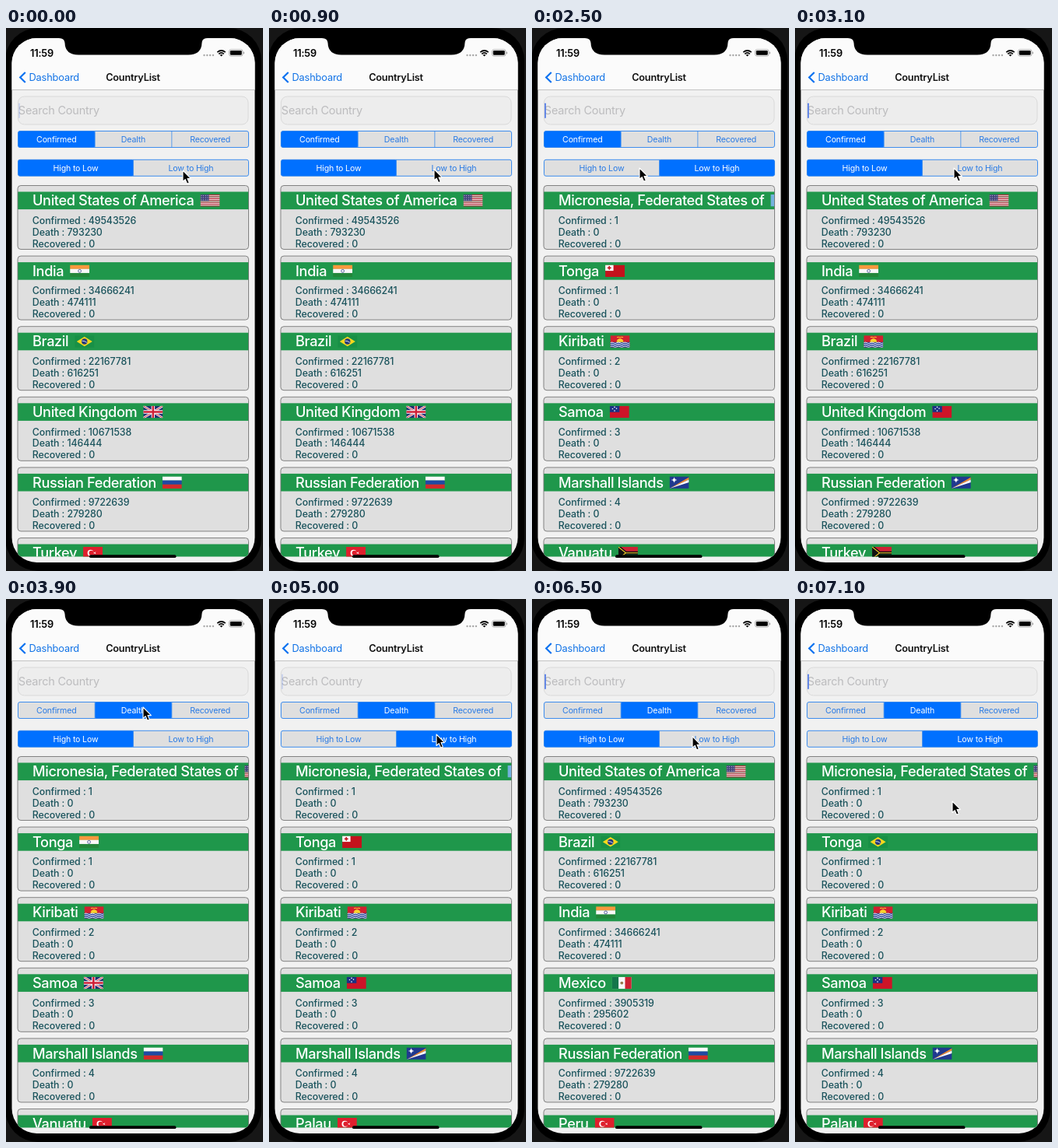
An HTML page that plays this animation: 330x698 px, repeating every 7200 ms.

```html
<!DOCTYPE html>
<html lang="en">
<head>
<meta charset="utf-8">
<style>
  html, body { margin: 0; width: 100%; height: 100%; overflow: hidden; background: #161616; }
  svg { display: block; }
  text { font-family: Inter, sans-serif; letter-spacing: -.015em; white-space: pre; }
  .mid { text-anchor: middle; }
  .seg text { font-size: 10.6px; fill: #2a7be4; }
  .seg .on { fill: #0070ff; }
  .seg text.on { fill: #fff; }
  .name { font-size: 18.2px; font-weight: 500; letter-spacing: -.021em; fill: #fff; }
  .info { font-size: 12.4px; font-weight: 500; letter-spacing: -.008em; fill: #1a535c; }
</style>
</head>
<body>
<svg width="330" height="698" viewBox="0 0 330 698">
  <defs>
    <clipPath id="screen"><rect x="7.500" y="13" width="312" height="674" rx="32"/></clipPath>
    <clipPath id="listArea"><rect x="7" y="195" width="314" height="484.5"/></clipPath>
    <clipPath id="cardArea"><rect width="296.5" height="82" rx="4"/></clipPath>
    <clipPath id="flagArea"><rect width="25" height="15.5"/></clipPath>
  </defs>
  <rect x="-1" width="329" height="698" rx="42"/>
  <g clip-path="url(#screen)">
    <rect width="330" height="698" fill="#f1f1f1"/>
    <rect width="330" height="79" fill="#fbfbfb"/>
    <path d="M0 79.500H330" stroke="#c4c4c4"/>
    <path d="M68 12V13Q75 13 75.500 19Q76 34.500 93 34.500H234Q251 34.500 251.500 19Q252 13 259 13V12Z"/>
    <text class="mid" x="46" y="36.500" font-size="12.8" font-weight="600">11:59</text>
    <g fill="#a9a9a9">
      <circle cx="254.500" cy="35" r="1.200"/><circle cx="258.300" cy="35" r="1.200"/>
      <circle cx="262.100" cy="35" r="1.200"/><circle cx="265.900" cy="35" r="1.200"/>
    </g>
    <path d="M271.300 31.200Q276.500 26.800 281.700 31.200M273.200 33.300Q276.500 30.600 279.800 33.300" fill="none" stroke="#000" stroke-width="1.700"/>
    <path d="M274.500 34.600Q276.500 33.200 278.500 34.600L276.500 36.600Z"/>
    <rect x="286.500" y="27.700" width="17.500" height="8.400" rx="2.400" fill="none" stroke="#a0a0a0" stroke-width=".8"/>
    <rect x="287.800" y="29" width="14.900" height="5.800" rx="1.300"/>
    <rect x="304.800" y="30.500" width="1.200" height="2.800" rx=".6" fill="#a0a0a0"/>
    <path d="M24.800 57L18.200 63.500L24.800 70" fill="none" stroke="#0a72f0" stroke-width="2.200"/>
    <text x="29.500" y="68" font-size="12.85" fill="#1273e6">Dashboard</text>
    <text class="mid" x="163" y="67.500" font-size="12.7" font-weight="600" fill="#111">CountryList</text>
    <rect x="15.500" y="88" width="295.500" height="36" rx="8" fill="#ededed" stroke="#d9d9d9"/>
    <text x="15.800" y="111" font-size="14.500" fill="#bcbcbe">Search Country</text>
    <rect id="caret" x="16.200" y="96.500" width="1.700" height="19.500" rx=".8" fill="#4f78e6"/>
    <g id="metric" class="seg"></g>
    <g id="order" class="seg"></g>
    <g id="list" clip-path="url(#listArea)"></g>
    <rect x="107" y="677.300" width="111.500" height="3.800" rx="1.900"/>
  </g>
  <path id="cursor" d="M0 0V14.500L3.200 11.600L5.600 17.200L8.300 16.100L6 10.600H10.400Z" stroke="#fff" stroke-width="1.100" stroke-linejoin="round"/>
</svg>
<script>
const LOOP = 7200, STEP = 100;
const $ = id => document.getElementById(id);

const rect = (x, y, w, h, fill) => `<rect x="${x}" y="${y}" width="${w}" height="${h}" fill="${fill}"/>`;
const line = (d, stroke, width = 1) => `<path d="${d}" fill="none" stroke="${stroke}" stroke-width="${width}"/>`;
const shape = (d, fill) => `<path d="${d}" fill="${fill}"/>`;
const dot = (x, y, r, fill = '#fff') => `<circle cx="${x}" cy="${y}" r="${r}" fill="${fill}"/>`;
const base = fill => rect(0, 0, 25, 15.5, fill);
const bands = (...colours) => colours.map((c, i) => rect(0, i * 15.5 / colours.length, 25, 15.5 / colours.length + .1, c)).join('');
const waves = [9.6, 12, 14.4].map(y => line(`M0 ${y}q2.100-1.600 4.200 0t4.200 0t4.200 0t4.200 0t4.200 0t4.200 0`, '#fff', 1)).join('');
const saltire = 'M0 0L25 15.500M25 0L0 15.500', cross = 'M12.500 0V15.500M0 7.750H25';

const flags = {
  us: bands(...Array.from({ length: 13 }, (_, i) => i % 2 ? '#f2e4e6' : '#c0293f')) + rect(0, 0, 11, 8.3, '#3f3f78') +
    Array.from({ length: 12 }, (_, i) => dot(1.6 + i % 4 * 2.6, 1.5 + (i >> 2) * 2.6, .5)).join(''),
  in: bands('#f7983c', '#f8f8f8', '#23873a') + `<circle cx="12.500" cy="7.750" r="1.900" fill="none" stroke="#33408c" stroke-width=".8"/>`,
  br: base('#189046') + shape('M12.500 1.500L22.500 7.750L12.500 14L2.500 7.750Z', '#f8d81c') + dot(12.5, 7.75, 3.7, '#26397c') + line('M9.300 7Q13 6.800 15.500 9.200', '#fff', .8),
  gb: base('#222f70') + line(saltire, '#fff', 2.6) + line(saltire, '#cf2038', 1) + line(cross, '#fff', 4.4) + line(cross, '#cf2038', 2.6),
  ru: bands('#fafafa', '#2049a4', '#d22b2b'),
  tr: base('#df1f2d') + dot(9.5, 7.75, 3.9) + dot(10.6, 7.75, 3.1, '#df1f2d') + shape('M13.200 7.750L16.500 6.200L15.500 7.750L16.500 9.300Z', '#fff'),
  fm: base('#74b2de') + dot(12.5, 3.4, 1) + dot(12.5, 12.1, 1) + dot(7.5, 7.75, 1) + dot(17.5, 7.75, 1),
  to: base('#c4121c') + rect(0, 0, 10.5, 7.5, '#fff') + line('M5.200 1.400V6.200M2.800 3.800H7.600', '#c4121c', 1.6),
  ki: base('#d3202f') + dot(12.5, 8.5, 4.4, '#f9d22c') + line('M8.500 2.500Q11 1.500 12.500 2.800Q14 1.500 16.500 2.500', '#f9d22c') + rect(0, 8.6, 25, 7, '#213b94') + waves,
  ws: base('#cd1428') + rect(0, 0, 12.5, 8, '#1b3284') + dot(6.2, 1.6, .8) + dot(6.2, 6.3, .8) + dot(3.7, 3.7, .8) + dot(8.7, 3.3, .8),
  mh: base('#20398f') + shape('M0 15.500L25 1V4.200Z', '#ef8b2f') + shape('M0 15.500L25 4.200V7.500Z', '#fff') + dot(6, 4.6, 1.9) + line('M6 1.200V8M2.600 4.600H9.400', '#fff', .7),
  vu: bands('#cf2234', '#168a45') + line('M0 0L9.500 7.750H25M0 15.500L9.500 7.750', '#111', 4) + line('M0 0L9.500 7.750H25M0 15.500L9.500 7.750', '#f2ca2c', 1.1) + shape('M0 2L7 7.750L0 13.500Z', '#111'),
  mx: base('#f8f8f8') + rect(0, 0, 8.3, 15.5, '#14764a') + rect(16.7, 0, 8.3, 15.5, '#cc2233') + dot(12.5, 7.75, 1.9, '#98784c'),
};

// Name, confirmed, deaths
const usa = ['United States of America', 49543526, 793230], india = ['India', 34666241, 474111],
  brazil = ['Brazil', 22167781, 616251], russia = ['Russian Federation', 9722639, 279280];
const fewest = [['Micronesia, Federated States of', 1, 0], ['Tonga', 1, 0], ['Kiribati', 2, 0], ['Samoa', 3, 0], ['Marshall Islands', 4, 0]];
const lists = {
  mostCases: [usa, india, brazil, ['United Kingdom', 10671538, 146444], russia, ['Turkey', 0, 0]],
  fewestCases: [...fewest, ['Vanuatu', 0, 0]],
  mostDeaths: [usa, brazil, india, ['Mexico', 3905319, 295602], russia, ['Peru', 0, 0]],
  fewestDeaths: [...fewest, ['Palau', 0, 0]],
};

// Time, metric tab, order tab, list, flags per row (images load after the text)
const states = [
  [0, 0, 0, 'mostCases', 'us in br gb ru tr'],
  [1500, 0, 1, 'fewestCases', 'us in br gb ru tr'],
  [1600, 0, 1, 'fewestCases', 'us to br gb ru tr'],
  [1700, 0, 1, 'fewestCases', 'fm to ki gb ru tr'],
  [1800, 0, 1, 'fewestCases', 'fm to ki ws mh vu'],
  [2900, 0, 0, 'mostCases', 'fm to ki ws mh vu'],
  [3000, 0, 0, 'mostCases', 'us in ki ws mh vu'],
  [3200, 0, 0, 'mostCases', 'us in br gb ru tr'],
  [3800, 1, 0, 'fewestCases', 'us in br gb ru tr'],
  [3900, 1, 0, 'fewestCases', 'us in ki gb ru tr'],
  [4000, 1, 0, 'fewestCases', 'fm to ki ws mh tr'],
  [4800, 1, 1, 'fewestDeaths', 'fm to ki ws mh tr'],
  [5700, 1, 0, 'mostDeaths', 'fm to ki ws mh tr'],
  [5900, 1, 0, 'mostDeaths', 'us br ki ws mh tr'],
  [6000, 1, 0, 'mostDeaths', 'us br in mx ru tr'],
  [6600, 1, 1, 'fewestDeaths', 'us br in mx ru tr'],
  [6800, 1, 1, 'fewestDeaths', 'us br ki ws mh tr'],
];

// Time, x, y
const path = [[0, 227, 183], [500, 217, 181], [1300, 207, 182], [1800, 207, 182], [2500, 138, 180], [2850, 142, 180],
  [3100, 204, 180], [3300, 204, 178], [3700, 176, 139], [4000, 176, 139], [4600, 215, 174], [5000, 215, 174],
  [5500, 122, 175], [5900, 122, 175], [6400, 206, 176], [6650, 206, 178], [7000, 202, 260], [7200, 202, 260]];

const clamp = v => Math.max(0, Math.min(1, v));

function tabs(y, labels, active) {
  const w = 296 / labels.length;
  return `<rect x="15.500" y="${y}" width="296" height="21" rx="2.500" fill="#dfdfdf"/>` +
    labels.map((label, i) => {
      const x = 15.5 + i * w, on = i === active ? 'on' : '';
      return (on && `<rect class="on" x="${x}" y="${y}" width="${w}" height="21" rx="2"/>`) +
        (i ? line(`M${x} ${y}v21`, '#3c8cec', .8) : '') +
        `<text class="mid ${on}" x="${x + w / 2}" y="${y + 14.4}">${label}</text>`;
    }).join('') +
    `<rect x="15.500" y="${y}" width="296" height="21" rx="2.500" fill="none" stroke="#2b83ee" stroke-width=".9"/>`;
}

function card([name, confirmed, deaths], i, flag) {
  const info = [`Confirmed : ${confirmed}`, `Death : ${deaths}`, 'Recovered : 0'];
  return `<g transform="translate(15 ${202.5 + i * 90.6})"><g clip-path="url(#cardArea)">
    ${rect(0, 0, 297, 82, '#dfdfdf')}${rect(0, 8, 297, 22.6, '#1f974b')}
    <text class="name" x="19" y="25.800">${name}</text>
    <g class="flag" clip-path="url(#flagArea)">${flags[flag]}</g>
    ${info.map((s, k) => `<text class="info" x="18.800" y="${49.4 + k * 14.8}">${s}</text>`).join('')}
    </g><rect width="296.500" height="82" rx="4" fill="none" stroke="#777" stroke-width=".9"/></g>`;
}

function show([, metric, order, list, codes]) {
  $('metric').innerHTML = tabs(132.5, ['Confirmed', 'Dealth', 'Recovered'], metric);
  $('order').innerHTML = tabs(169.3, ['High to Low', 'Low to High'], order);
  codes = codes.split(' ');
  $('list').innerHTML = lists[list].map((row, i) => card(row, i, codes[i])).join('');
  for (const flag of document.querySelectorAll('.flag')) {
    const end = 19 + flag.previousElementSibling.getComputedTextLength();
    flag.setAttribute('transform', `translate(${end + 8} 11.500)`);
  }
}

function cursorAt(t) {
  const i = path.findIndex(p => p[0] > t);
  const [t0, x0, y0] = path[i - 1], [t1, x1, y1] = path[i];
  const p = (t - t0) / (t1 - t0), k = p * p * (3 - 2 * p);
  return `translate(${x0 + (x1 - x0) * k} ${y0 + (y1 - y0) * k})`;
}

function caretAt(t) {
  const phase = t % 1000;
  return phase < 500 ? clamp(.25 + phase / 130) : clamp((750 - phase) / 150);
}

let current;
function frame() {
  const t = Math.floor(performance.now() % LOOP / STEP) * STEP;
  const state = states.findLast(s => s[0] <= t);
  if (state !== current) show(current = state);
  $('caret').setAttribute('opacity', caretAt(t));
  $('cursor').setAttribute('transform', cursorAt(t));
  requestAnimationFrame(frame);
}
frame();
</script>
</body>
</html>
```
